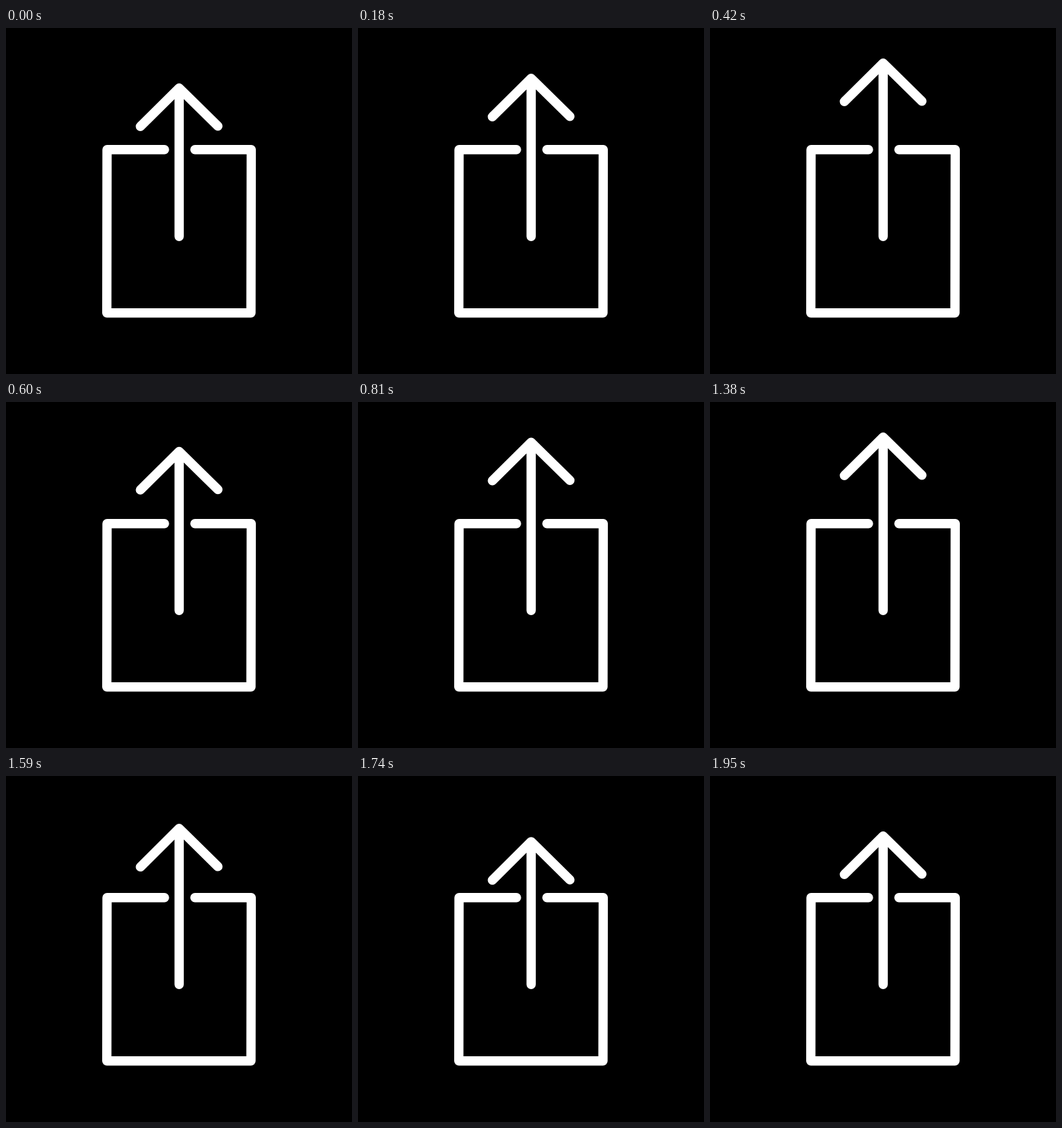
Recreate the animation shown at these times as an HTML page. Size 500 by 500 pixels, loop 3.66 s.

```html
<!DOCTYPE html>
<html lang="en">
<head>
<meta charset="utf-8">
<title>Share arrow</title>
<style>
  html, body { margin: 0; width: 100%; height: 100%; overflow: hidden; background: #000; }
  svg { display: block; width: 100%; height: 100%; }
  path { fill: none; stroke: #fff; stroke-width: 13.4; stroke-linecap: round; stroke-linejoin: round; }
</style>
</head>
<body>
<svg viewBox="0 0 500 500">
  <path d="M229 175.8H146L145.7 411.8H354L354.4 175.8H273"/>
  <path id="arrow"/>
</svg>
<script>
  const LOOP = 3660, STEP = 30;
  // [time in ms, height of the arrow tip]
  const keys = [
    [0, 86.7], [420, 50.7], [660, 75], [900, 50.7],
    [1140, 75], [1380, 50.7], [1770, 95.5], [1950, 86.7], [LOOP, 86.7]
  ];
  const arrow = document.getElementById('arrow');
  const ease = p => (1 - Math.cos(Math.PI * p)) / 2;

  function tipAt(t) {
    const i = keys.findIndex(k => k[0] > t);
    const [t0, y0] = keys[i - 1], [t1, y1] = keys[i];
    return y0 + (y1 - y0) * ease((t - t0) / (t1 - t0));
  }

  function draw(ms) {
    const t = Math.floor((ms % LOOP) / STEP) * STEP;
    const y = tipAt(t);
    arrow.setAttribute('d', `M194.2 ${y + 55.6}L250.2 ${y}L306.2 ${y + 55.1}M250.2 ${y}V301.3`);
  }

  const start = performance.now();
  function tick() {
    draw(performance.now() - start);
    requestAnimationFrame(tick);
  }
  tick();
</script>
</body>
</html>
```
